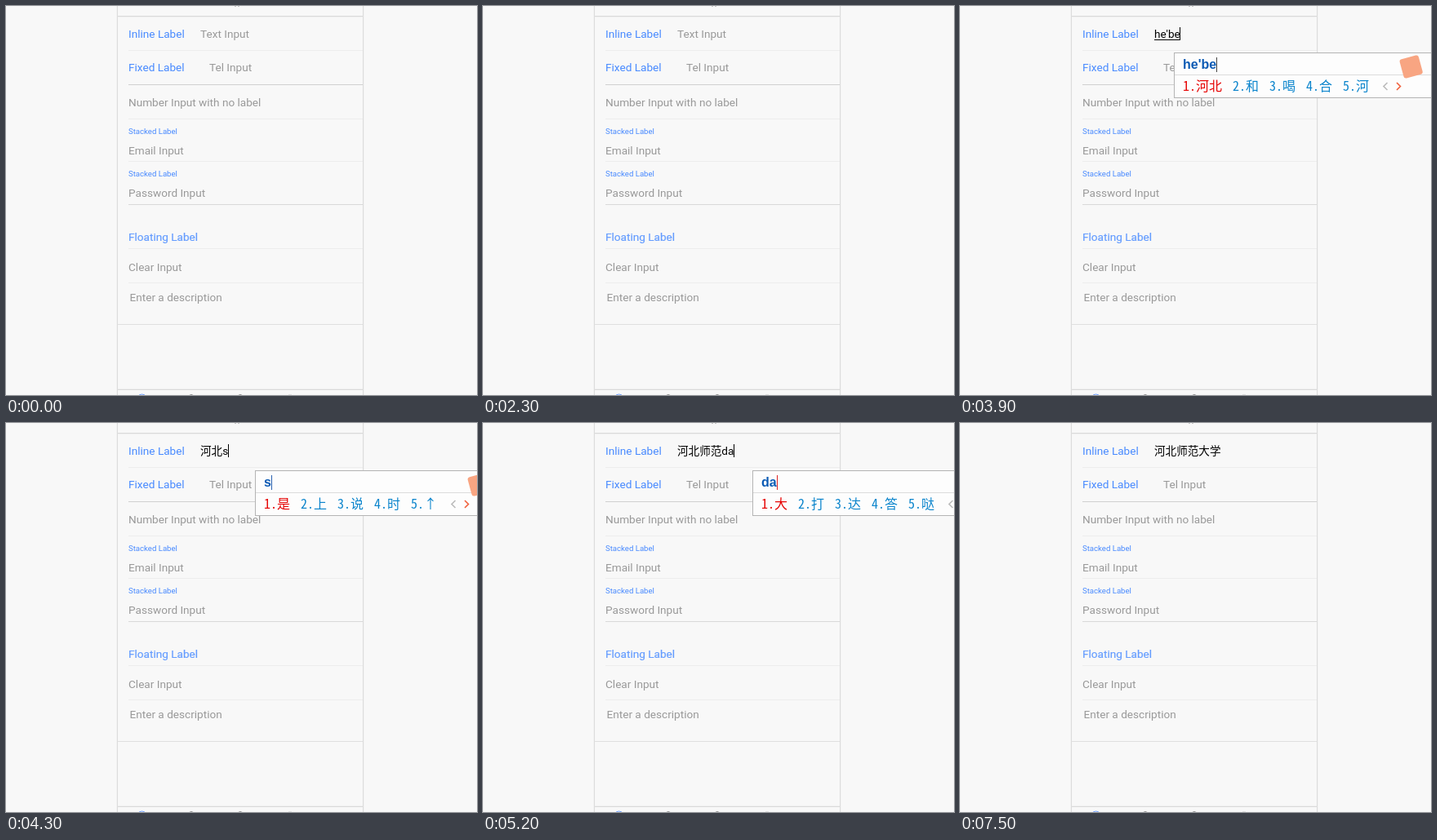
Recreate the animation shown at these times as an HTML page. Size 577 by 477 pixels, loop 8 s.

```html
<!DOCTYPE html>
<html lang="en">
<head>
<meta charset="utf-8">
<title>Form inputs</title>
<style>
  html, body { margin: 0; width: 100%; height: 100%; overflow: hidden; background: #f8f8f8; }
  svg { display: block; width: 577px; height: 477px; }
  text { font: 13.6px Roboto, "Noto Sans CJK SC", "Noto Sans CJK", sans-serif; white-space: pre; }
  .label { fill: #488aff; }
  .small { font-size: 9.6px; }
  .float { fill: #649cff; stroke: #649cff; stroke-width: .2; }
  .hint { fill: #999; }
  .comp { font: bold 16px "Liberation Sans", Arial, sans-serif; fill: #0a5ab4; }
  .cand { font: 16px "Noto Sans Mono CJK SC", "Noto Sans CJK SC", "Noto Sans CJK", monospace; font-weight: 300; fill: #0a84cc; }
  .cand tspan:first-child { fill: #e60000; }
  .line { shape-rendering: crispEdges; fill: none; }
  .chevron { fill: none; stroke-width: 1.6; }
</style>
</head>
<body>
<svg viewBox="0 0 577 477">
  <g class="line">
    <path stroke="#f2f2f2" d="M135.5 0V477M438.5 0V477"/>
    <path stroke="#dcdcdc" d="M136.5 0V477M437.5 0V477"/>
    <path stroke="#dadada" d="M137 12.5H437M137 470.5H437"/>
    <path stroke="#f0f0f0" d="M137 13.5H437M137 469.5H437"/>
    <path stroke="#ededed" d="M150 54.5H437M150 138.5H437M150 190.5H437M150 297.5H437M150 339.5H437"/>
    <path stroke="#d0d0d0" d="M150 96.5H437"/>
    <path stroke="#d9d9d9" d="M150 243.5H437"/>
    <path stroke="#e0e0e0" d="M137 390.5H437"/>
  </g>
  <path fill="none" stroke="#bbb" d="M280 .3h2M284 .3h2"/>
  <path fill="none" stroke="#6fa0ff" d="M163 477l3.500-1 3.500 1"/>
  <path fill="none" stroke="#888" d="M223 478q4-3 8 0M283 478q4-3 8 0"/>
  <path fill="none" stroke="#ddd" d="M346 476.700h4"/>

  <text class="label" x="150" y="39">Inline Label</text>
  <text class="hint" id="hint" x="238" y="39">Text Input</text>
  <text class="label" x="150" y="80">Fixed Label</text>
  <text class="hint" x="249" y="80">Tel Input</text>
  <text class="hint" x="150" y="123">Number Input with no label</text>
  <text class="label small" x="150" y="157">Stacked Label</text>
  <text class="hint" x="150" y="182">Email Input</text>
  <text class="label small" x="150" y="209">Stacked Label</text>
  <text class="hint" x="150" y="234">Password Input</text>
  <text class="float" x="150" y="287.500">Floating Label</text>
  <text class="hint" x="150" y="325">Clear Input</text>
  <text class="hint" x="151.500" y="362">Enter a description</text>

  <text id="value" x="238" y="39"></text>
  <path id="under" class="line" stroke="#000"/>
  <rect id="caret" class="line" style="fill:#000" width="1" height="16"/>

  <g id="ime">
    <rect x=".5" y=".5" width="420" height="55" fill="#fdfdfd" stroke="#b4b4b4"/>
    <path class="line" stroke="#dcdcdc" d="M1 27.500H420"/>
    <text class="comp" id="comp" x="11" y="20"></text>
    <rect id="mark" y="6" width="1" height="18"/>
    <text class="cand" id="cand" y="47"></text>
    <g id="tail">
      <path class="chevron" stroke="#bbb" d="M22.500 37l-4.500 4.500 4.500 4.500"/>
      <path class="chevron" stroke="#f0603c" d="M34 37l4.500 4.500-4.500 4.500"/>
      <rect x="37" y="9" width="24" height="24" rx="3" fill="#f8a582" transform="rotate(-15 37 9)"/>
    </g>
  </g>
</svg>
<script>
const LOOP = 8000, LEFT = 238;
const $ = id => document.getElementById(id);
const [hint, value, under, caret, ime, comp, mark, cand, tail] =
  ["hint", "value", "under", "caret", "ime", "comp", "mark", "cand", "tail"].map($);

// One entry per word: committed text before it, candidate window place, keystrokes with candidates
const words = [
  { start: 3600, end: 4200, before: "", x: 262, y: 57, ink: "#444", keys: [
    ["h", "好 和 还 \\(^o^)/~ 会"],
    ["he", "和 喝 合 河 何"],
    ["he'b", "河北 和 喝 合 河"],
    ["he'be", "河北 和 喝 合 河"],
    ["he'bei", "河北 河北省 和 喝 合"]] },
  { start: 4300, end: 5000, before: "河北", x: 305, y: 58, ink: "#2a62b0", keys: [
    ["s", "是 上 说 时 ↑"],
    ["sh", "是 上 说 时 收"],
    ["shi", "是 时 事 使 市"],
    ["shi'f", "是否 师傅 释放 师范 示范"],
    ["shi'fa", "是否 释放 师范 示范 是"],
    ["shi'fan", "师范 示范 是 时 事"]] },
  { start: 5100, end: 5700, before: "河北师范", x: 330, y: 58, ink: "#d22", times: [0, 100, 300, 400, 500], keys: [
    ["d", "的 都 到 大 对"],
    ["da", "大 打 达 答 哒"],
    ["da'x", "大学 大小 大象 大写 大"],
    ["da'xu", "大学 大选 大雪 大 打"],
    ["da'xue", "大学 大雪 大 打 达"]] }
];
const commits = [[5700, "河北师范大学"], [5000, "河北师范"], [4200, "河北"], [0, ""]];
// Caret switches on and off in turn
const blinks = [1000, 1400, 1900, 2300, 2800, 3200, 3600, 6200, 6600, 7500];

const show = (el, on) => el.setAttribute("visibility", on ? "visible" : "hidden");
const cellWidth = s => [...s].reduce((w, c) => w + (c < "\x7f" ? 8 : 16), 0);

function drawWindow(word, [keys, list]) {
  ime.setAttribute("transform", `translate(${word.x} ${word.y})`);
  comp.textContent = keys;
  mark.setAttribute("x", Math.round(11 + comp.getComputedTextLength()));
  mark.setAttribute("fill", word.ink);
  cand.textContent = "";
  let x = 11;
  list.split(" ").forEach((item, i) => {
    const span = document.createElementNS("http://www.w3.org/2000/svg", "tspan");
    span.textContent = `${i + 1}.${item}`;
    span.setAttribute("x", x);
    cand.append(span);
    x += cellWidth(span.textContent) + 13;
  });
  tail.setAttribute("transform", `translate(${x - 13} 0)`);
}

function keyAt(word, t) {
  const times = word.times || word.keys.map((_, i) => i * 100);
  return word.keys[times.filter(d => t >= word.start + d).length - 1];
}

function draw(t) {
  const word = words.find(w => t >= w.start && t < w.end);
  const key = word && keyAt(word, t);
  const text = word ? word.before + key[0] : commits.find(c => t >= c[0])[1];
  const inTel = t >= 7000;

  value.textContent = text;
  const end = LEFT + (text ? value.getComputedTextLength() : 0);
  show(hint, !text);
  show(ime, word);
  show(under, word && word === words[0]);
  if (word) {
    drawWindow(word, key);
    under.setAttribute("d", `M${LEFT} 41.500H${Math.floor(end)}`);
  }
  caret.setAttribute("x", inTel ? 249 : Math.floor(end));
  caret.setAttribute("y", inTel ? 67 : 26);
  show(caret, blinks.filter(b => t >= b).length % 2);
}

let last = "";
function frame() {
  const t = performance.now() % LOOP;
  const step = Math.floor(t / 100);
  if (step !== last) draw(step * 100);
  last = step;
  requestAnimationFrame(frame);
}
draw(0);
requestAnimationFrame(frame);
</script>
</body>
</html>
```
